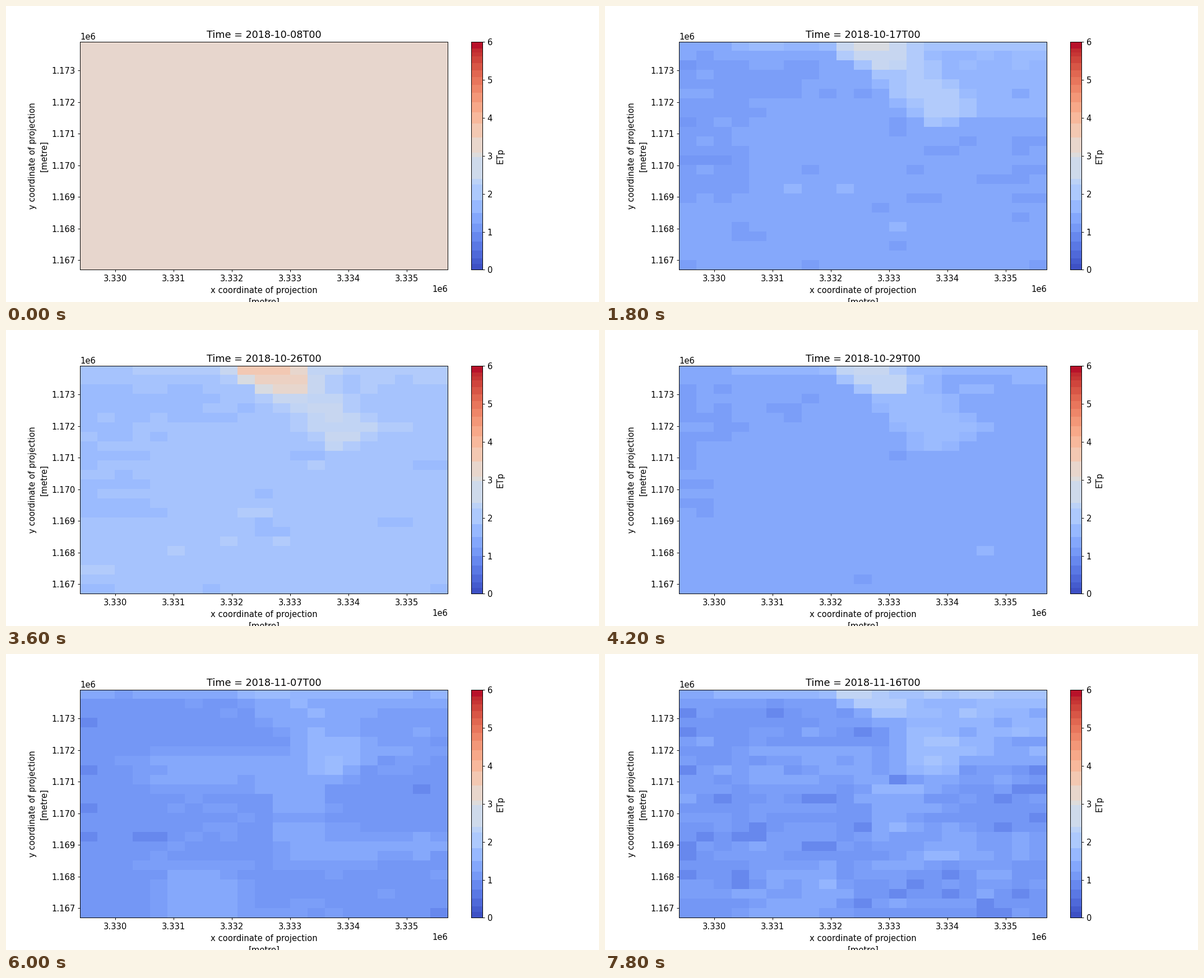
Recreate the animation shown at these times as a matplotlib script. Size 1058 by 529 pixels, loop 8 s.

```python
import numpy as np
import matplotlib.pyplot as plt
from matplotlib.animation import FuncAnimation

COLS, ROWS = 21, 24
DAYS, STEP_MS = 40, 200
START = np.datetime64("2018-10-08")
W, H = 1058, 529
K = 0.8817  # scales point sizes to the stage

plt.rcParams.update({
    "font.family": "DejaVu Sans",
    "font.size": 12 * K,
    "axes.linewidth": 0.8 * K,
    "axes.titlepad": 6 * K,
    "axes.labelpad": 5 * K,
})
for axis in ("xtick", "ytick"):
    plt.rcParams.update({
        f"{axis}.major.size": 3.5 * K,
        f"{axis}.major.pad": 3.5 * K,
        f"{axis}.major.width": 0.8 * K,
    })

row, col = np.mgrid[:ROWS, :COLS]


def ridge(x0, y0, x1, y1, width):
    """Flat-topped band around the segment (x0, y0)-(x1, y1), in cells."""
    dx, dy = x1 - x0, y1 - y0
    t = ((col - x0) * dx + (row - y0) * dy) / (dx * dx + dy * dy)
    t = np.clip(t, 0, 1)
    dist = np.hypot(col - x0 - t * dx, row - y0 - t * dy)
    return np.exp(-(dist / width) ** 4)


def sigmoid(z):
    return 1 / (1 + np.exp(-z))


# terrain features shared by every day
plume = ridge(10.8, 0.3, 14.5, 6.5, 1.9)
core = ridge(9.6, 0, 11.4, 1.2, 1.5)
east = sigmoid(3 * (col - 12.5)) * sigmoid(3 * (7.3 - row))
north = np.exp(-row / 0.9)
west = np.maximum(ridge(1, 1, 1, 14, 2.3), ridge(1, 4, 6, 4, 2.2))
bands = np.maximum.reduce([
    ridge(5, 8, 13, 8, 2.2),
    ridge(12, 8, 12, 16, 1.5),
    ridge(12, 16.5, 19, 16, 1.6),
    ridge(6.5, 20.5, 6.5, 23, 2.6),
])
FEATURES = [np.ones((ROWS, COLS)), plume, core, east, north, west, bands]

# day: base, then the strength of each feature, then speckle
KEYS = {
    0: (3.25, 0, 0, 0, 0, 0, 0, 0),
    4: (0.87, 0.85, 0.15, 0.25, 0, -0.21, 0, 0.09),
    9: (1.36, 0.58, 0.65, 0.24, 0.3, -0.15, 0, 0.06),
    18: (1.93, 0.50, 1.0, 0.05, 0.25, -0.13, 0, 0.06),
    24: (0.85, 0.24, 0.28, 0.06, 0.15, -0.07, 0, 0.03),
    30: (1.08, 0.35, 0, 0.15, 0.3, -0.05, 0.29, 0.06),
    39: (1.10, 0.25, 0.5, 0.42, 0.5, 0, 0.25, 0.14),
}
TONES = np.array([0.5, 0.66, 0.86, 1.08, 1.21, 1.37, 1.62, 1.75, 1.94, 2.15,
                  2.42, 2.55, 2.9, 3.25, 3.4, 3.65])


def speckle(day):
    """Noise in short horizontal streaks, part lasting and part daily."""
    fixed = np.random.default_rng(5).normal(size=(ROWS, COLS))
    daily = np.random.default_rng(day).normal(size=(ROWS, COLS))
    noise = (fixed + daily) / 2
    return noise + 0.7 * np.roll(noise, 1, axis=1)


def values(day):
    """Sum the features for a day and snap to the tone steps."""
    *gains, rough = [np.interp(day, list(KEYS), track)
                     for track in zip(*KEYS.values())]
    grid = sum(g * f for g, f in zip(gains, FEATURES)) + rough * speckle(day)
    return TONES[np.abs(grid[..., None] - TONES).argmin(axis=-1)]


def place(x, width):
    """Axes rectangle from pixels; all plots share one vertical span."""
    return [x / W, (H - 471.4) / H, width / W, 407.1 / H]


fig = plt.figure(figsize=(W / 100, H / 100), dpi=100, facecolor="white")
ax = fig.add_axes(place(132.3, 656))
image = ax.imshow(values(0), cmap="coolwarm", vmin=0, vmax=6, aspect="auto",
                  interpolation="nearest",
                  extent=(3.3294e6, 3.3357e6, 1.1667e6, 1.1739e6))
ax.set_xlabel("x coordinate of projection\n[metre]", linespacing=1.45)
ax.set_ylabel("y coordinate of projection\n[metre]", linespacing=1.45)
title = ax.set_title("")

# stepped colour scale
edges = np.array([0, 0.15, 0.3, 0.5, 0.74, 0.99, 1.22, 1.49, 1.84, 2.25, 2.4,
                  2.97, 3.08, 3.48, 3.85, 4.15, 4.42, 4.66, 4.87, 5.07, 5.26,
                  5.45, 5.62, 5.73, 5.83, 6])
middles = (edges[:-1] + edges[1:]) / 2
bar = fig.add_axes(place(829.5, 20.5))
bar.pcolormesh([0, 1], edges, middles[:, None], cmap="coolwarm",
               vmin=0, vmax=6)
bar.set_xticks([])
bar.set_yticks(range(7))
bar.yaxis.tick_right()
bar.yaxis.set_label_position("right")
bar.set_ylabel("ETp")


def update(day):
    image.set_data(values(day))
    title.set_text(f"Time = {START + day}T00")
    return image, title


anim = FuncAnimation(fig, update, frames=DAYS, interval=STEP_MS, repeat=True,
                     repeat_delay=0, blit=False)
plt.show()
```
